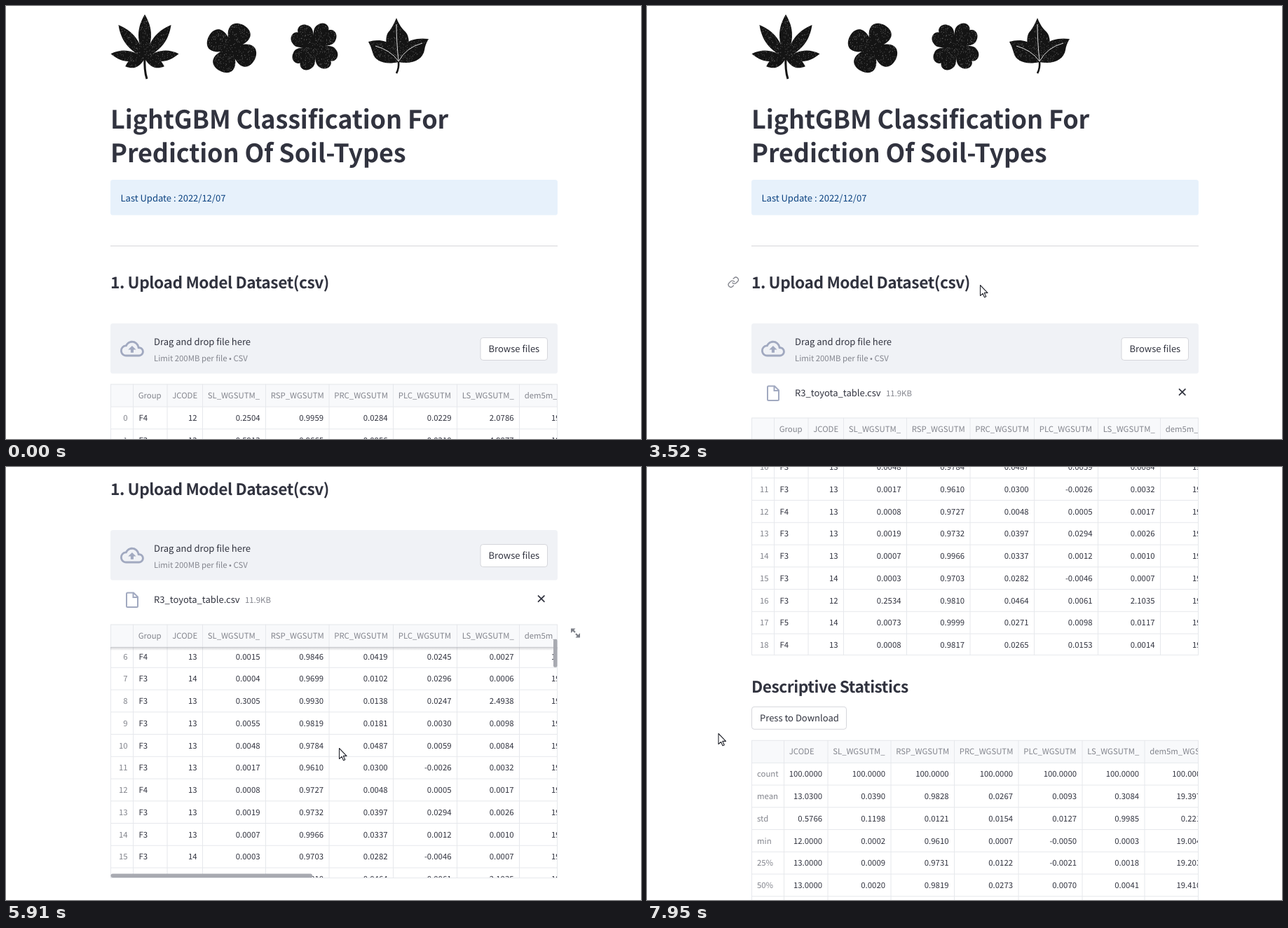
These frames come from a looping animation (906 by 618 pixels, 8000 ms). An HTML page:

```html
<!DOCTYPE html>
<html lang="en">
<head>
<meta charset="utf-8">
<title>Soil types</title>
<style>
html, body { margin: 0; height: 100%; overflow: hidden; background: #fff; }
svg { display: block; width: 100%; height: 100%; }
text {
  font-family: "Noto Sans CJK JP", "Noto Sans CJK SC", "Noto Sans CJK", "Noto Sans", sans-serif;
  text-rendering: geometricPrecision;
  white-space: pre;
}
</style>
</head>
<body>
<svg id="stage" viewBox="0 0 906 618" xmlns="http://www.w3.org/2000/svg"></svg>
<script>
const LOOP = 8000, ROW = 31.75, HEAD = 32.5;
const INK = '#31333f', GREY = '#83858d', LINE = '#e6e8ec', ICON = '#a1a9c0';
const BODY = 13, SMALL = 11.37;

const text = (x, y, s, size = BODY, fill = INK, more = '') =>
  `<text x="${x}" y="${y}" font-size="${size}" fill="${fill}" ${more}>${s}</text>`;
const rect = (x, y, w, h, fill, more = '') =>
  `<rect x="${x}" y="${y}" width="${w}" height="${h}" fill="${fill}" ${more}/>`;
const path = (d, more = '') => `<path d="${d}" ${more}/>`;
const heading = (y, s) => text(149, y, s, 22.7, INK, 'font-weight="600" letter-spacing="-.43"');
const button = (x, y, w, s, id) =>
  `<g id="${id}">` + rect(x, y, w, 32, '#fff', 'rx="3.6" stroke="#d5d6db"') +
  text(x + 11.5, y + 20.8, s) + '</g>';
const random = seed => () => (seed = seed * 16807 % 2147483647) / 2147483647;

// Leaf pictures
function leaflet(angle, length, w) {
  const at = (k, px) => `${px} ${-length * k}`;
  return path(`M0 0C${at(.4, -w)} ${at(.68, -w)} ${at(1, 0)}C${at(.68, w)} ${at(.4, w)} 0 0Z`,
    `transform="translate(198 75) rotate(${angle})"`);
}

function leaves() {
  const hemp = [0, 1, 2, 3].map(i => {
    const angle = [0, 38, 82, 112][i], length = [63, 61, 49, 30][i];
    return leaflet(angle, length, 12 - i) + (i ? leaflet(-angle, length, 12 - i) : '');
  }).join('');
  const petal = 'M0 3C-9-8-18-17-16-27C-13-40 13-40 16-27C18-17 9-8 0 3Z';
  const heart = 'M0 3C-8-10-20-16-17-26C-15-36-4-38 0-31C4-38 15-36 17-26C20-16 8-10 0 3Z';
  const ring = (d, x, y, turn) => [0, 1, 2, 3].map(i =>
    path(d, `transform="translate(${x} ${y}) rotate(${turn + i * 90})"`)).join('');
  const ivy = path('M560 80C543 72 539 48 545 38Q552 30 557 17Q562 30 570 37C579 47 575 70 560 80Z') +
    path('M560 80C542 84 526 80 523 66Q521 58 517 51C530 47 543 49 549 56Q556 66 560 80Z') +
    path('M560 80C580 84 595 76 597 63Q598 55 603 47C588 45 576 48 570 54Q563 66 560 80Z');
  const shapes = hemp + ring(petal, 322, 60, 27) + ring(heart, 440, 58, 41) + ivy;

  const rnd = random(7);
  let dots = '';
  for (let i = 0; i < 3600; i++)
    dots += `M${(148 + rnd() * 456).toFixed(1)} ${(12 + rnd() * 86).toFixed(1)}h.7`;
  const stems = path('M198 72Q197 92 201 104', 'stroke-width="3"') +
    path('M560 79Q561 89 557 96', 'stroke-width="2.6"');
  const veins = path('M560 79Q557 50 557 26M560 79Q549 63 527 57M560 79Q571 59 594 53',
    'stroke="#ddd" stroke-width="1" fill="none"');
  return `<clipPath id="leafClip">${shapes}</clipPath><g fill="#141414">${shapes}</g>` +
    `<g fill="none" stroke="#141414">${stems}</g>` +
    path(dots, 'stroke="#fff" stroke-width=".8" opacity=".45" clip-path="url(#leafClip)"') + veins;
}

// Soil samples, and the statistics computed from them
const names = ['JCODE', 'SL_WGSUTM_', 'RSP_WGSUTM', 'PRC_WGSUTM', 'PLC_WGSUTM', 'LS_WGSUTM_', 'dem5m_WGSUTM'];
const rnd = random(31);
const samples = Array.from({ length: 100 }, () => {
  const steep = rnd() < .1, code = rnd();
  const slope = steep ? .22 + .4 * rnd() ** 3 : .0002 - .0022 * Math.log(1 - rnd());
  return [
    code < .12 ? 12 : code < .24 ? 14 : 13,
    slope,
    1 - .04 * rnd() ** 1.5,
    .055 * rnd(),
    .045 * rnd() ** 2 - .005,
    slope * (steep ? 8.3 : 1.4 + rnd()),
    19 + .75 * rnd()
  ];
});
const fixed = v => v.toFixed(4);
const soil = samples.slice(0, 19).map(([code, ...rest], i) =>
  [i, i % 6 ? i === 17 ? 'F5' : 'F3' : 'F4', code, ...rest.map(fixed)]);

const mean = a => a.reduce((s, v) => s + v, 0) / a.length;
const quantile = q => a => {
  const sorted = [...a].sort((x, y) => x - y), p = q * (a.length - 1), i = Math.floor(p);
  return sorted[i] + (p - i) * (sorted[i + 1] - sorted[i]);
};
const measures = {
  count: a => a.length,
  mean,
  std: a => Math.sqrt(mean(a.map(v => (v - mean(a)) ** 2)) * a.length / (a.length - 1)),
  min: a => Math.min(...a),
  '25%': quantile(.25),
  '50%': quantile(.5)
};
const stats = Object.entries(measures).map(([label, f]) =>
  [label, ...names.map((_, c) => fixed(f(samples.map(r => r[c]))))]);

// Drawn from its own top edge; lead holds the borders before the decimal columns.
function table(id, lead, heads, rows, height, leftCol) {
  const edges = [...lead];
  for (const w of [90, 90.5, 91.5, 91, 89, 94.5]) edges.push(edges.at(-1) + w);
  let cells = '', lines = '';
  rows.forEach((row, r) => {
    const y = HEAD + r * ROW;
    row.forEach((v, c) => {
      const left = c === leftCol;
      cells += text(left ? edges[c] + 8 : edges[c + 1] - 8, y + 20, v, SMALL, c ? INK : GREY,
        left ? '' : 'text-anchor="end"');
    });
    lines += `M149 ${y + ROW}H787`;
  });
  const cols = edges.slice(1, -1).map(x => `M${x} 0V${height}`).join('');
  const labels = heads.map((h, i) => text(edges[i + 1] + 7.2, 20.3, h, SMALL, GREY)).join('');
  return `<clipPath id="${id}Box">${rect(149, 0, 638, height + .5, '#000')}</clipPath>
    <clipPath id="${id}Body">${rect(149, HEAD, 638, height - HEAD, '#000')}</clipPath>
    <g clip-path="url(#${id}Box)">
      <g clip-path="url(#${id}Body)"><g id="${id}Rows">${path(lines, `stroke="${LINE}"`)}${cells}</g></g>
      ${rect(149, 0, 638, HEAD, '#f8f9fb')}
      ${path(cols + `M149 ${HEAD}H787`, `stroke="${LINE}"`)}${labels}
    </g>
    ${rect(149.5, .5, 637, height - .5, 'none', `stroke="${LINE}"`)}`;
}

const cloud = 'M19.35 10.04A7.49 7.49 0 0 0 12 4C9.11 4 6.6 5.64 5.35 8.04A6 6 0 0 0 0 14c0 3.31 2.69 6 6 6h13' +
  'c2.76 0 5-2.24 5-5 0-2.64-2.05-4.78-4.65-4.96zM19 18H6c-2.21 0-4-1.79-4-4 0-2.05 1.53-3.76 3.56-3.97' +
  'l1.07-.11.5-.95A5.47 5.47 0 0 1 12 6c2.62 0 4.88 1.86 5.39 4.43l.3 1.5 1.53.11A2.98 2.98 0 0 1 22 15' +
  'c0 1.65-1.35 3-3 3zM8 13h2.55v3h2.9v-3H16l-4-4z';
const chain = 'M10 13a5 5 0 0 0 7.54.54l3-3a5 5 0 0 0-7.07-7.07l-1.72 1.71' +
  'M14 11a5 5 0 0 0-7.54-.54l-3 3a5 5 0 0 0 7.07 7.07l1.71-1.71';
const arrow = 'M-6.5-6.5h6.5l-2.2 2.2 2.5 2.5-1.6 1.6-2.5-2.5-2.7 2.7z';

const stage = document.getElementById('stage');
stage.innerHTML = `
<defs>
  <linearGradient id="shade" x2="0" y2="1"><stop stop-color="#31333f" stop-opacity=".22"/><stop offset="1" stop-color="#31333f" stop-opacity="0"/></linearGradient>
  <linearGradient id="glass" x2="1" y2="1"><stop stop-color="#f0f8fb"/><stop offset="1" stop-color="#cfe6f1"/></linearGradient>
</defs>
<g id="page">
  ${leaves()}
  ${['LightGBM Classification For', 'Prediction Of Soil-Types'].map((s, i) =>
    text(149, 174.5 + 48 * i, s, 36, INK, 'font-weight="700" letter-spacing="-.12"')).join('')}
  ${rect(149, 248, 638, 50.5, '#e7f1fb', 'rx="3.6"')}
  ${text(163.5, 278.5, 'Last Update : 2022/12/07', BODY, '#0b4280')}
  ${rect(149, 342, 638, 1, '#d6d6d9')}
  ${path(chain, `id="link" transform="translate(114.7 385.7) scale(.71)" fill="none" stroke="${GREY}" stroke-width="1.9" stroke-linecap="round"`)}
  ${heading(403, '1. Upload Model Dataset(csv)')}
  ${rect(149, 453, 638, 71.5, '#f0f2f6', 'rx="3.6"')}
  ${path(cloud, `transform="translate(163 472.2) scale(1.41)" fill="${ICON}"`)}
  ${text(211, 483.8, 'Drag and drop file here')}
  ${text(211, 506.6, 'Limit 200MB per file • CSV', SMALL, '#84868f')}
  ${button(677, 473.5, 95.5, 'Browse files', 'browse')}
  <g id="file">
    ${path('M173.5 542.5H182L188 548.5V561.5Q188 563 186.5 563H173.5Q172 563 172 561.5V544Q172 542.5 173.5 542.5ZM181.5 543V549H187.5', `fill="none" stroke="${ICON}" stroke-width="2"`)}
    ${text(211, 556.6, 'R3_toyota_table.csv')}
    ${text(341, 556.6, '11.9KB', SMALL, GREY)}
    ${path('M759 546.3l9.4 9.4m0-9.4l-9.4 9.4', `stroke="${INK}" stroke-width="1.7"`)}
  </g>
  <g id="data">
    ${table('soil', [149, 181.5, 230, 280.5], ['Group', ...names], soil, 362, 1)}
    ${rect(149, HEAD, 638, 5, 'url(#shade)', 'id="shadow"')}
    <g id="tools">
      ${rect(781, .5, 5.5, 40, '#a8aab1', 'id="thumb" rx="2.7"')}
      ${rect(149.5, 356, 287.5, 5.5, '#a8aab1', 'rx="2.7"')}
      ${[0, 180].map(a => path(arrow, `fill="#7d8088" transform="translate(812.5 12.5) rotate(${a})"`)).join('')}
    </g>
  </g>
  ${heading(1003, 'Descriptive Statistics')}
  ${button(149.5, 1023.5, 135, 'Press to Download', 'save')}
  <g transform="translate(0 1071)">
    ${table('stats', [149, 195.5, 258], names, stats, 260, 0)}
  </g>
</g>
<g id="pointer">
  <g id="drag">
    ${path('M48.5-82V11.5H-45', 'fill="none" stroke="#5b6a73" stroke-width="2.5" opacity=".4"')}
    ${rect(-47.5, -84.5, 95, 95, 'url(#glass)', 'opacity=".75" stroke="#c3dae5"')}
    ${path('M-29.5-76.5H11L28-59.5V0H-29.5Z', 'fill="#f8fbfc" fill-opacity=".7" stroke="#9b9fa1" stroke-width="1.2"')}
    ${path('M11-76.5V-59.5H28', 'fill="none" stroke="#9b9fa1" stroke-width="1.2"')}
    ${rect(-39, -58, 39, 38.5, '#3a996b')}
    <circle cx="-1" cy="-1" r="10.5" fill="#f1ee4f" opacity=".92"/>
    ${rect(9.5, 11.5, 46, 16.5, '#fff', 'stroke="#666"')}
    ${path('M14 19.7h9M18.5 15.2v9', 'stroke="#16309a" stroke-width="2"')}
    ${text(27.5, 23.6, 'コピー', 10.5, '#1b3580', 'letter-spacing="-2.6"')}
  </g>
  ${path('M.5.5V15.5L4 12.3L6.5 17.8L8.8 16.8L6.3 11.4H11Z', 'fill="#fff" stroke="#24262e" stroke-width="1.1" stroke-linejoin="round"')}
</g>`;

// Motion: pointer stops as [ms, x, y]
const track = [
  [500, 905, 388], [640, 840, 390], [900, 590, 350], [1060, 482, 375], [1240, 640, 475], [1580, 680, 486],
  [2170, 680, 486], [2450, 625, 549], [2920, 476, 407], [3110, 475, 398], [4130, 475, 398],
  [4550, 475, 401], [6270, 475, 401], [7060, 101.5, 380]
];

// Monotone cubic through the track, so holds stay still.
function along(t, c) {
  const last = track.length - 1;
  if (t <= track[0][0]) return track[0][c];
  if (t >= track[last][0]) return track[last][c];
  const i = track.findIndex(p => p[0] > t) - 1;
  const slope = k => (track[k + 1][c] - track[k][c]) / (track[k + 1][0] - track[k][0]);
  const tangent = k => {
    if (k <= 0 || k >= last) return 0;
    const a = slope(k - 1), b = slope(k);
    return a * b <= 0 ? 0 : 2 * a * b / (a + b);
  };
  const h = track[i + 1][0] - track[i][0], u = (t - track[i][0]) / h, v = 1 - u;
  return v * v * (1 + 2 * u) * track[i][c] + u * u * (3 - 2 * u) * track[i + 1][c] +
    h * u * v * (v * tangent(i) - u * tangent(i + 1));
}

// Every wheel tick eases the scroll on by one notch.
const smooth = u => (u = Math.max(0, Math.min(1, u)), u * u * (3 - 2 * u));
const wheel = (t, ticks) => ticks.reduce((sum, s) => sum + 90.75 * smooth((t - s) / 220), 0);
const pageTicks = [3690, 3958, 4200, 4460, 7220, 7331, 7560, 7840];
const rowTicks = [5400, 5630, 5862];

const el = {};
for (const n of stage.querySelectorAll('[id]')) el[n.id] = n;
const move = (n, x, y) => n.setAttribute('transform', `translate(${x.toFixed(2)} ${y.toFixed(2)})`);
const show = (n, on) => n.setAttribute('visibility', on ? 'inherit' : 'hidden');
const [browseBox, browseText] = el.browse.children;

function draw(t) {
  const x = along(t, 1), y = along(t, 2), inner = wheel(t, rowTicks), loaded = t >= 1910;
  move(el.page, 0, -wheel(t, pageTicks));
  move(el.data, 0, loaded ? 587.5 : 539.5);
  move(el.soilRows, 0, -inner);
  move(el.thumb, 0, inner * .108);
  move(el.pointer, x, y);
  show(el.pointer, t >= 500);
  show(el.drag, t >= 500 && t < 1780);
  show(el.file, loaded);
  show(el.link, t >= 3000 && t < 4530);
  show(el.tools, t >= 4410 && x > 149);
  show(el.shadow, inner > 0);
  const hot = t >= 2170 && t < 2320;
  browseBox.setAttribute('stroke', hot ? '#ff4b4b' : '#d5d6db');
  browseText.setAttribute('fill', hot ? '#ff4b4b' : INK);
}

const start = performance.now();
function tick() {
  draw((performance.now() - start) % LOOP);
  requestAnimationFrame(tick);
}
tick();
</script>
</body>
</html>
```
